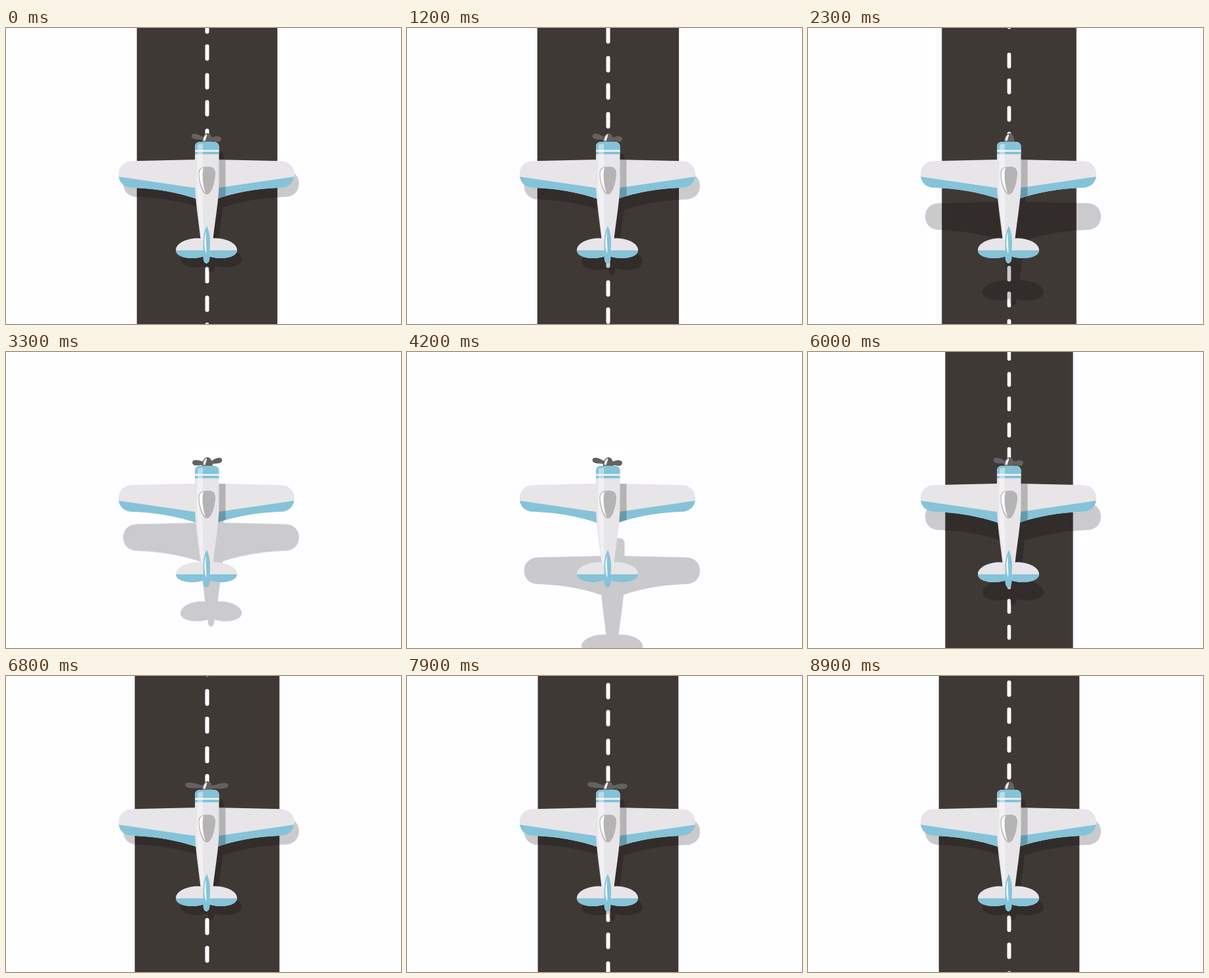
An HTML page with a canvas for the animation above (9 s loop, 600 by 450 pixels).

```html
<!DOCTYPE html>
<html lang="en">
<head>
<meta charset="utf-8">
<title>Plane</title>
<style>
html, body { margin: 0; width: 100%; height: 100%; overflow: hidden; background: #fefdff; }
canvas { display: block; }
</style>
</head>
<body>
<canvas id="stage" width="600" height="450"></canvas>
<script>
const ctx = document.getElementById('stage').getContext('2d');
const LOOP = 9000, STEP = 100, CENTER = 305.5, PLANE_X = 304.5;
const BLUE = '#85c3d8', GREY = '#e7e5e8', METAL = '#646162';

// Half shapes for the left side, mirrored about PLANE_X for the right.
const wing = new Path2D('M290 200 L192 202.3 C179 202.5 171 211 171 222 C171 235 180 242.6 192 242.8 C226 244 262 250 290 260 Z');
const wingTrim = new Path2D('M160 224.5 L290 243.5 V270 H160 Z');
const tail = new Path2D('M305 322 C297 319 289 319 281 320.5 C267 323 258 330 258 337.5 C258 346 270 350 283 350 C293 350 300 347.5 305 345 Z');
const body = new Path2D('M287 181 Q287 173 295 173 H315 Q323.5 173 323.5 181 V235 C323.5 262 317 295 314 326 L310 345 H300 L296 326 C293 295 287 262 287 235 Z');
const gloss = new Path2D('M291 178 Q293 176 299 176 V235 C298 262 300 295 300 322 H297 C294 295 290 262 290 235 Z');
const canopy = new Path2D('M305 211 C314 210 318.5 214 318 223 C317 236 312 253 305.5 253 C298 253 293 236 292.5 223 C292 214 296 211 305 211 Z');
const canopyShine = new Path2D('M300 212.5 C294 214 293 219 294 227 C295 237 299 247 303 250.5 C299 240 297 222 300 212.5 Z');
const fin = new Path2D('M305 301 C308 307 310 316 310 325 C310 334 309 340 309.5 346 C310 353 308 358 304.5 358 C301 358 299 353 299.5 346 C300 340 299.5 334 299.5 325 C299.5 316 302 307 305 301 Z');
const finShine = new Path2D('M304 309 C300.5 317 300.5 334 304 343 C305.5 334 302.5 320 304 309 Z');
const hub = new Path2D('M297.5 173 C298 165 302 160 306 160 C310 160 313.5 165 314 173 Z');
const hubShine = new Path2D('M299.5 171.5 C300 166 302 162.5 305 161.5 C306 164 303 168 303 171.5 Z');

// Half turn of the propeller: left length, left tilt, right length, right tilt.
const blades = [
  [25, .22, 21, .02],
  [32, .15, 29, .06],
  [34, .11, 32, .09],
  [23, .04, 23, .24],
  [13, .02, 14, .3],
  [0, 0, 0, 0]
];

// Time and value pairs, eased between neighbours.
const shadowKeys = [[1000, 14], [2150, 65], [2750, 59], [3250, 59], [4150, 110], [4600, 110], [6480, 13], [7150, 14]];
const scaleKeys = [[1000, 1], [1600, 1.03], [3350, .82], [5000, .8], [7150, 1.045], [7950, 1]];

function ease(keys, t) {
  const i = keys.findIndex(k => k[0] > t);
  if (i < 0) return keys[keys.length - 1][1];
  if (i === 0) return keys[0][1];
  const [t0, a] = keys[i - 1], [t1, b] = keys[i];
  return a + (b - a) * (1 - Math.cos(Math.PI * (t - t0) / (t1 - t0))) / 2;
}

function fill(path, color) {
  ctx.fillStyle = color;
  ctx.fill(path);
}

function bothSides(draw) {
  draw();
  ctx.save();
  ctx.translate(2 * PLANE_X, 0);
  ctx.scale(-1, 1);
  draw();
  ctx.restore();
}

function clipped(path, draw) {
  ctx.save();
  ctx.clip(path);
  draw();
  ctx.restore();
}

function rect(x, y, w, h, color) {
  ctx.fillStyle = color;
  ctx.fillRect(x, y, w, h);
}

// Dashes come in pairs; a wider gap lies just above the joint.
function road(top, bottom, joint, scale) {
  ctx.save();
  ctx.translate(CENTER, 0);
  ctx.scale(scale, scale);
  rect(-106.75, top, 213.5, bottom - top, '#3f3936');
  ctx.strokeStyle = '#fefdff';
  ctx.lineWidth = 6;
  ctx.lineCap = 'round';
  ctx.beginPath();
  for (let k = -30; k <= 30; k++) {
    const first = joint + k * 84.6 - (k < 0 ? 19 : 0);
    for (const y of [first, first + 41]) {
      if (y < top || y > bottom) continue;
      ctx.moveTo(0, y - 9.5);
      ctx.lineTo(0, y + 9.5);
    }
  }
  ctx.stroke();
  ctx.restore();
}

function drawRoad(t) {
  const scale = ease(scaleKeys, t);
  if (t < 4000) {
    const joint = 51.7 + (t - 2300) * .6126;
    road(joint - 90.7, 1000, joint, scale);
  } else {
    const speed = t < 6800 ? .6168 : .6075;
    const end = 1075.5 + (t - 6800) * speed;
    road(-1000, end, end - 2059.1, scale);
  }
}

const silhouette = new Path2D();
const mirror = new DOMMatrix([-1, 0, 0, 1, 2 * PLANE_X, 0]);

function drawShadow(dy) {
  // Opaque shapes are merged first so overlaps do not darken.
  const layer = drawShadow.layer ||= shadowLayer();
  ctx.globalAlpha = .2;
  ctx.drawImage(layer, 7, dy);
  ctx.globalAlpha = 1;
}

function shadowLayer() {
  const layer = document.createElement('canvas');
  layer.width = 600;
  layer.height = 450;
  const c = layer.getContext('2d');
  const m = mirror;
  for (const p of [body, fin, wing, tail]) c.fill(p);
  c.setTransform(m);
  for (const p of [wing, tail]) c.fill(p);
  return layer;
}

function blade(length, tilt, side) {
  if (!length) return;
  ctx.save();
  ctx.translate(306, 169.5);
  ctx.scale(side, 1);
  ctx.rotate(-tilt);
  ctx.beginPath();
  ctx.moveTo(2, -1.5);
  ctx.bezierCurveTo(length * .45, -3, length * .55, -5, length * .8, -4.5);
  ctx.bezierCurveTo(length * 1.06, -4, length * 1.06, 2, length * .85, 3.5);
  ctx.bezierCurveTo(length * .65, 4.5, length * .45, 2, 2, 2);
  ctx.fillStyle = METAL;
  ctx.fill();
  ctx.restore();
}

function drawPlane(t) {
  const [left, leftTilt, right, rightTilt] = blades[t / STEP % 6];
  blade(left, leftTilt, -1);
  blade(right, rightTilt, 1);
  fill(hub, METAL);
  fill(hubShine, '#f4f3f4');

  bothSides(() => {
    fill(wing, GREY);
    clipped(wing, () => fill(wingTrim, BLUE));
  });
  ctx.save();
  ctx.transform(-1, 0, 0, 1, 2 * PLANE_X, 0);
  clipped(wing, () => rect(275.5, 195, 12, 70, 'rgba(0,0,0,.22)'));
  ctx.restore();

  bothSides(() => {
    fill(tail, GREY);
    clipped(tail, () => rect(250, 338, 60, 15, BLUE));
  });

  fill(body, GREY);
  clipped(body, () => {
    rect(280, 170, 50, 22, BLUE);
    rect(280, 185.5, 50, 2.5, '#f7f6f8');
    rect(280, 338, 50, 20, BLUE);
  });
  fill(gloss, 'rgba(255,255,255,.42)');
  fill(canopy, '#b5b3b4');
  fill(canopyShine, '#fefdff');
  fill(fin, BLUE);
  fill(finShine, '#fefdff');
}

function frame(now) {
  const t = Math.floor(now % LOOP / STEP) * STEP;
  rect(0, 0, 600, 450, '#fefdff');
  drawRoad(t);
  drawShadow(ease(shadowKeys, t));
  drawPlane(t);
  requestAnimationFrame(frame);
}
frame(0);
</script>
</body>
</html>
```
